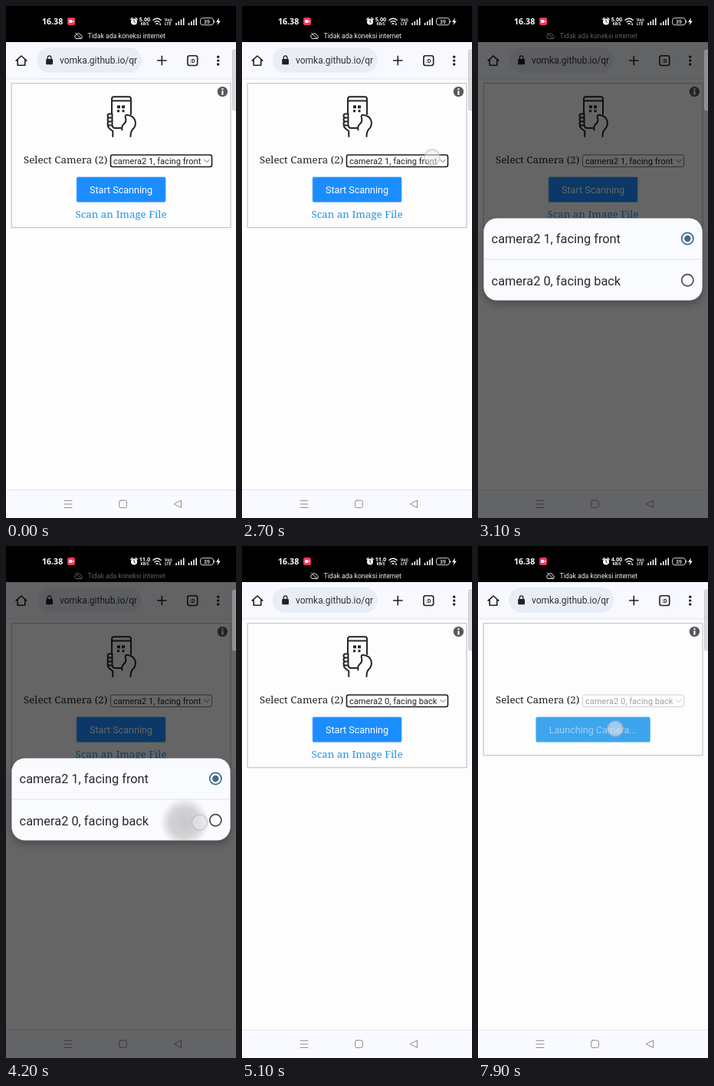
Write an HTML page that moves like this. It is 300x667 px and loops after 8000 ms.

```html
<!DOCTYPE html>
<html lang="id">
<head>
<meta charset="utf-8">
<title>Camera selection</title>
<style>
  html, body { margin: 0; width: 100%; height: 100%; overflow: hidden; background: #fefdfe; }
  svg { display: block; width: 300px; height: 667px; }
  text { font-family: Roboto, sans-serif; }
  .serif { font-family: "Noto Serif", serif; font-size: 13.33px; }
  .status { font-family: "Open Sans", sans-serif; font-weight: 700; fill: #fff; }
  .mid { text-anchor: middle; }
  .line { fill: none; stroke-linecap: round; stroke-linejoin: round; }
</style>
</head>
<body>
<svg viewBox="0 0 300 667">
  <defs>
    <radialGradient id="rippleFill">
      <stop offset="0" stop-color="#777" stop-opacity=".38"/>
      <stop offset=".6" stop-color="#777" stop-opacity=".3"/>
      <stop offset="1" stop-color="#777" stop-opacity="0"/>
    </radialGradient>
    <clipPath id="row"><path d="M7.400 330.500h285.200v35.500q0 17.500-17.500 17.500h-250.200q-17.500 0-17.500-17.500z"/></clipPath>
    <filter id="soft" x="-10%" y="-20%" width="120%" height="140%"><feGaussianBlur stdDeviation="5"/></filter>
    <g id="bars" fill="#fff">
      <rect y="6.5" width="1.6" height="3"/><rect x="3.2" y="4.5" width="1.6" height="5"/>
      <rect x="6.4" y="2.2" width="1.6" height="7.3"/><rect x="9.6" width="1.6" height="9.5"/>
    </g>
  </defs>

  <rect width="300" height="667" fill="#fefdfe"/>
  <rect width="300" height="47" fill="#000"/>

  <!-- notice -->
  <path class="line" stroke="#e8e8e8" d="M92 42.500h5.200a2.200 2.200 0 0 0 .5-4.300a3.300 3.300 0 0 0-6-1a2.700 2.700 0 0 0 .3 5.300M90.500 35l8 8"/>
  <text x="106.5" y="42.2" font-size="8.7" fill="#eee">Tidak ada koneksi internet</text>

  <!-- toolbar -->
  <rect y="47" width="300" height="48" fill="#f7f9fe"/>
  <rect y="94.5" width="300" height="1" fill="#e1e3e9"/>
  <rect x="40" y="54" width="137" height="33" rx="16.5" fill="#e9edf6"/>
  <path class="line" stroke="#202124" stroke-width="1.6" d="M13.200 71.200L20 65l6.800 6.200M15.200 70v7.200h9.600V70"/>
  <rect x="52.2" y="69" width="8.8" height="7.2" rx="1" fill="#202124"/>
  <path class="line" stroke="#202124" stroke-width="1.3" d="M54.300 69v-1.800a2.300 2.300 0 0 1 4.600 0V69"/>
  <text x="70" y="75.3" font-size="12" fill="#303238">vomka.github.io/qr</text>
  <path stroke="#202124" stroke-width="1.6" d="M197 71h12.600M203.300 64.700v12.600"/>
  <rect x="236.9" y="64.7" width="12.8" height="12.8" rx="2.5" fill="none" stroke="#202124" stroke-width="1.6"/>
  <text class="mid" x="243.3" y="73.5" font-size="7" font-weight="700" fill="#202124">:D</text>
  <g fill="#202124"><circle cx="276.7" cy="66.2" r="1.7"/><circle cx="276.7" cy="71.1" r="1.7"/><circle cx="276.7" cy="76" r="1.7"/></g>

  <!-- page -->
  <rect id="frame" x="7.2" y="100.7" width="285.8" height="188" fill="none" stroke="#c5c4cb" stroke-width="1.2"/>
  <circle cx="282.4" cy="111.6" r="6.7" fill="#58575b"/>
  <path d="M281.300 107.200h2.200v2h-2.200zM281.300 110.400h2.200v5.400h-2.200z" fill="#fff"/>
  <g id="idle">
    <g class="line" stroke="#252427" stroke-width="2">
      <path d="M138 139.500V121q0-2.800 2.800-2.800h19.400q2.800 0 2.800 2.800V141M138 123.400h25"/>
      <path d="M138.500 140.500h-3.500a2.500 2.500 0 0 0 0 5h3.500M135 145.500a2.500 2.500 0 0 0 0 5h3.500M135 150.500a2.500 2.500 0 0 0 0 5h3.500M138.500 140.500v15"/>
      <path d="M132.700 155q0 3 2.300 4.700l4.300 3.300v7M139 156.500q.5 2.500 3 2.500h9"/>
      <path d="M151.500 161.500q-1-5 2-7.500q4-3.500 2.500-8q-1.500-4.500 2.500-4q8 1 10 7.500q1.500 6.500-3 11q-3 3-3 9.500"/>
    </g>
    <g fill="#252427"><rect x="145" y="129.5" width="4" height="3.8"/><rect x="151" y="129.5" width="4" height="3.8"/><rect x="145" y="135.3" width="3" height="3"/><rect x="151.5" y="135.3" width="3" height="3"/></g>
    <text class="serif mid" x="150" y="276.2" fill="#2196e8">Scan an Image File</text>
  </g>
  <text class="serif mid" x="77.6" y="205.3" fill="#222">Select Camera (2)</text>
  <rect id="selectBox" x="136.5" y="194" width="132" height="15.5" rx="2.5" fill="#fff"/>
  <text id="choice" x="140" y="205.7" font-size="11.1"></text>
  <path id="chevron" class="line" stroke-width=".9" d="M258.800 200.300l3.200 3.200l3.200-3.200"/>
  <rect id="button" y="223" height="32.2" rx="1.5" stroke-width=".8"/>
  <text id="label" class="mid" x="150" y="243.7" font-size="12.55"></text>

  <!-- navigation -->
  <rect y="630" width="300" height="37" fill="#f8faff"/>
  <rect y="630" width="300" height="1" fill="#e4e5ea"/>
  <g class="line" stroke="#8c8d91">
    <path d="M76 644.300h10M76 648.900h10M76 653.500h10M228.500 644.300v9.200l-9-4.600z"/>
    <rect x="147.7" y="644" width="9.6" height="9.6" rx="2"/>
  </g>

  <rect id="dim" y="28" width="300" height="639" fill="#000"/>

  <!-- status bar -->
  <text class="status" x="47" y="24" font-size="10.6">16.38</text>
  <rect x="80" y="15" width="10" height="10" rx="2.5" fill="#f0365c"/>
  <path d="M82.300 18h3.800v4h-3.800zM86.500 19.700l1.700-1.300v3.200l-1.700-1.300z" fill="#fff"/>
  <circle cx="167" cy="20.5" r="4" fill="#fff"/>
  <path class="line" stroke="#fff" stroke-width="1.2" d="M162.800 17.500l2-2M171.200 17.500l-2-2"/>
  <path class="line" stroke="#000" stroke-width=".9" d="M167 18.300v2.400l1.500 1"/>
  <text id="speed" class="status mid" x="181" y="20.4" font-size="7.3"></text>
  <text class="status mid" x="181" y="25.3" font-size="4.7">KB/S</text>
  <path class="line" stroke="#fff" stroke-width="1.3" d="M191.800 18.400q5.200-4.300 10.400 0M193.800 20.900q3.200-2.500 6.400 0M195.800 23.200q1.200-.9 2.400 0"/>
  <path d="M200.300 22.500h1.500v2.500h-1.500z" fill="#fff"/>
  <text class="status" x="207" y="20" font-size="5">Vo))</text>
  <text class="status" x="207" y="24.7" font-size="4.8">LTE</text>
  <use href="#bars" x="221.3" y="15.5"/>
  <use href="#bars" x="237.8" y="15.5"/>
  <rect x="253.5" y="15.7" width="17" height="9" rx="3" fill="none" stroke="#ddd"/>
  <rect x="271.3" y="18.7" width="1" height="3" fill="#ddd"/>
  <text class="status mid" x="262" y="22.8" font-size="6.8" style="font-weight:600">39</text>
  <path d="M278 15.200l-4 5.700h2.500l-1 4.300l4.300-5.800h-2.600z" fill="#fff"/>

  <!-- option sheet -->
  <g id="dialog">
    <rect x="7" y="281" width="286" height="108" rx="18" fill="#000" opacity=".22" filter="url(#soft)"/>
    <rect x="7.4" y="276.4" width="285.2" height="107.2" rx="17.5" fill="#fafbff"/>
    <rect x="7.4" y="329.5" width="285.2" height="1" fill="#dfe2e8"/>
    <g clip-path="url(#row)"><circle id="ripple" cx="233" cy="360" fill="url(#rippleFill)"/></g>
    <g font-size="16.35" fill="#28292d">
      <text x="17.6" y="309.3">camera2 1, facing front</text>
      <text x="17.6" y="363.5">camera2 0, facing back</text>
    </g>
    <g fill="none" stroke-width="1.7">
      <circle cx="273.3" cy="303" r="7.6" stroke="#3d6c8c"/>
      <circle cx="273.3" cy="357.2" r="7.6" stroke="#47484c"/>
    </g>
    <circle cx="273.3" cy="303" r="4.2" fill="#3d6c8c"/>
  </g>

  <rect x="295.5" y="57" width="8" height="79" rx="2.5" fill="#bbb" fill-opacity=".5" stroke="#aaa" stroke-opacity=".6" stroke-width=".8"/>

  <circle id="touch" r="10" fill="#ececec" fill-opacity=".62" stroke="#b4b4b8" stroke-opacity=".5" stroke-width="2"/>
</svg>
<script>
const LOOP = 8000, STEP = 100;
const $ = id => document.getElementById(id);
const set = (id, attrs) => {
  for (const k in attrs) $(id).setAttribute(k, attrs[k]);
};

// [start, backdrop opacity, sheet opacity]
const fades = [
  [0, 0, 0], [2900, .07, .28], [3000, .36, .8], [3100, .6, 1],
  [4300, .47, .68], [4400, .24, .25], [4500, .08, 0], [4600, 0, 0]
];
const speeds = [[0, "5.00"], [3500, "11.0"], [7700, "4.00"]];
const ripples = [[0, 0], [4100, 18], [4200, 32], [4300, 43]];
const taps = [
  { at: 2700, x: 248, y: 197, alpha: [.9, .8, .4, .1] },
  { at: 4100, x: 252.5, y: 360, alpha: [.9, .9, .8, .4, .15] },
  { at: 7700, x: 179, y: 238, alpha: [.9, .9, .9] }
];
const current = (table, t) => table.filter(row => row[0] <= t).pop();

function draw(t) {
  const launching = t >= 7900;
  const focused = t < 2900 || t >= 4300;
  const [, dim, sheet] = current(fades, t);

  set("dim", { opacity: dim });
  set("dialog", { opacity: sheet });
  set("ripple", { r: current(ripples, t)[1] });
  $("speed").textContent = current(speeds, t)[1];

  $("choice").textContent = t < 4300 ? "camera2 1, facing front" : "camera2 0, facing back";
  set("choice", { fill: launching ? "#a19fa3" : "#222" });
  set("chevron", { stroke: launching ? "#b5b4b7" : "#555" });
  set("selectBox", {
    stroke: launching ? "#d0cfd3" : focused ? "#1c1c1f" : "#77767a",
    "stroke-width": focused && !launching ? 1.6 : 1
  });

  set("idle", { opacity: launching ? 0 : 1 });
  set("frame", { height: launching ? 172 : 188 });
  set("button", {
    x: launching ? 75.8 : 92.2,
    width: launching ? 148.6 : 115.8,
    fill: launching ? "#3da4ee" : "#1b8dff",
    stroke: launching ? "#5ab2f0" : "#4a9ff8"
  });
  $("label").textContent = launching ? "Launching Camera..." : "Start Scanning";
  set("label", { fill: launching ? "#9fd0f7" : "#fff" });

  const tap = taps.find(p => t >= p.at && t < p.at + p.alpha.length * STEP);
  set("touch", { opacity: tap ? tap.alpha[Math.floor((t - tap.at) / STEP)] : 0 });
  if (tap) set("touch", { transform: `translate(${tap.x} ${tap.y})` });
}

const start = performance.now();
function tick() {
  draw((performance.now() - start) % LOOP);
  requestAnimationFrame(tick);
}
tick();
</script>
</body>
</html>
```
